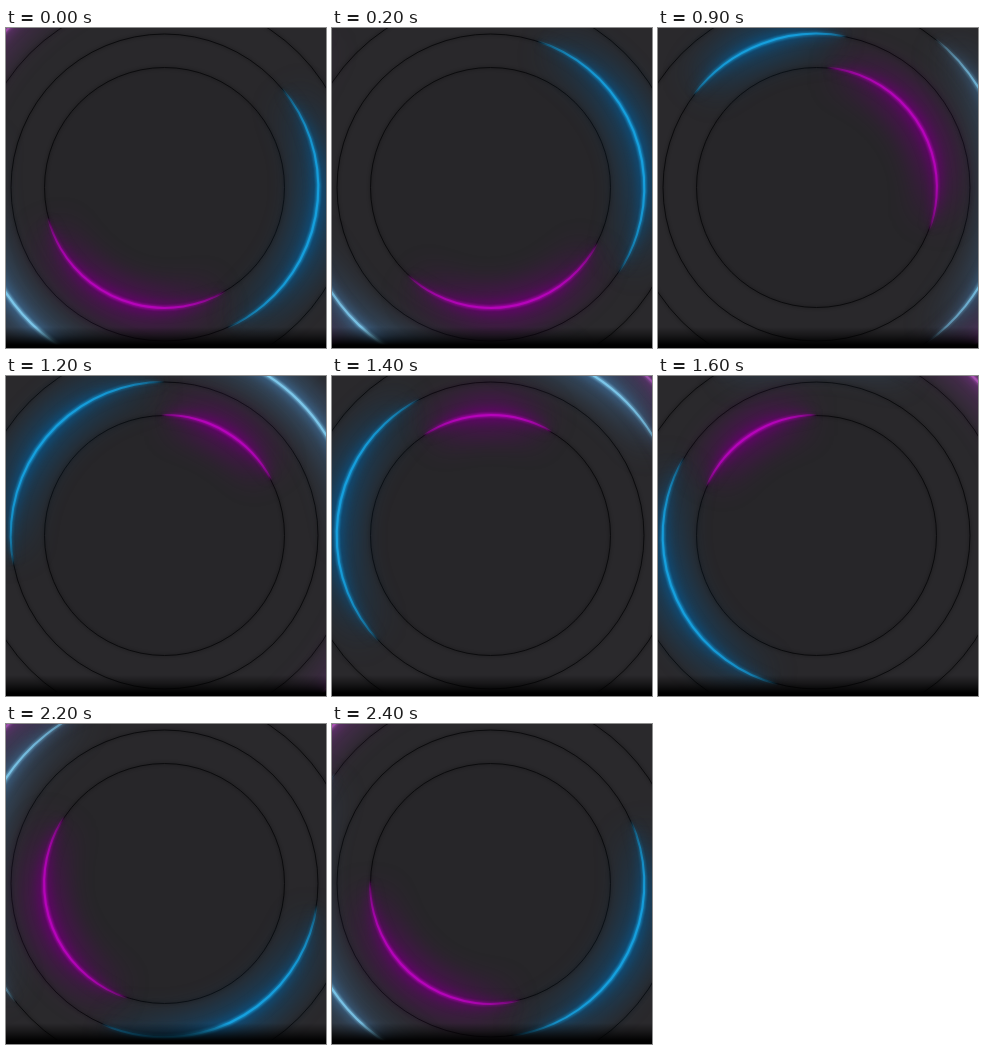
These frames come from a looping animation (320x320 px, 2.5 s). An HTML page with a canvas:

```html
<!DOCTYPE html>
<html lang="en">
<head>
<meta charset="utf-8">
<title>Neon rings</title>
<style>
  html, body { margin: 0; width: 100%; height: 100%; overflow: hidden; background: #000; }
  canvas { display: block; width: 100vw; height: 100vh; }
</style>
</head>
<body>
<canvas id="stage" width="320" height="320"></canvas>
<script>
const ctx = document.getElementById('stage').getContext('2d');
const SIZE = 320, CX = 158.5, CY = 159.5;
const STEP = 100, STEPS = 25;          // ms per step, steps per loop
const HOLD = 2.6, LAG = 6.6;           // rest at the top, delay of the tail, in steps
const SPEED = 360 / (STEPS - HOLD);    // degrees per step
const RAD = Math.PI / 180;

// top: the step at which the head of the light reaches twelve o'clock
const lights = [
  { r: 223, top: 15, core: '175,85,185', glow: '115,50,130', power: 0.8 },
  { r: 190.3, top: 11.4, core: '125,200,235', glow: '62,108,150', power: 0.95 },
  { r: 153.8, top: 3.1, core: '22,160,222', glow: '10,82,132', power: 1 },
  { r: 120.4, top: 9.3, core: '182,4,186', glow: '106,0,114', power: 1 }
];

const mod = (a, n) => ((a % n) + n) % n;
const turned = u => Math.max(0, mod(u, STEPS) - HOLD) * SPEED;

function circle(r, from = 0, to = 2 * Math.PI) {
  ctx.beginPath();
  ctx.arc(CX, CY, r, from, to);
}

function disc(r, colour) {
  ctx.fillStyle = colour;
  circle(r);
  ctx.fill();
}

function rim(r, width, colour, blur) {
  ctx.filter = blur ? `blur(${blur}px)` : 'none';
  ctx.lineWidth = width;
  ctx.strokeStyle = colour;
  circle(r);
  ctx.stroke();
  ctx.filter = 'none';
}

function drawBase() {
  ctx.fillStyle = '#2a292c';
  ctx.fillRect(0, 0, SIZE, SIZE);
  disc(153.5, '#29282b');
  disc(120, '#272629');
  for (const r of [190, 153.5, 120]) {
    rim(r, 3, 'rgba(0,0,0,0.2)', 1.5);
    rim(r, 1, '#0b0b0d', 0);
  }
}

// Strokes an arc that fades towards its ends; hidden is the part cut off at the head
function fadedArc(r, from, span, hidden, rgb, alpha, width, blur, power) {
  const g = ctx.createConicGradient(from, CX, CY);
  const full = span + hidden;
  for (let i = 0; i <= 24; i++) {
    const x = (hidden + span * i / 24) / full;
    const a = alpha * Math.pow(Math.max(0, Math.sin(Math.PI * x)), power);
    g.addColorStop(span / (2 * Math.PI) * i / 24, `rgba(${rgb},${a.toFixed(4)})`);
  }
  g.addColorStop(1, `rgba(${rgb},0)`);
  ctx.filter = blur ? `blur(${blur}px)` : 'none';
  ctx.strokeStyle = g;
  ctx.lineWidth = width;
  circle(r, from, from + span);
  ctx.stroke();
  ctx.filter = 'none';
}

function drawLight(light, step) {
  const { r, top, core, glow, power } = light;
  const head = turned(step - top);
  const tail = turned(step - top - LAG);
  const span = mod(head - tail, 360) * RAD;
  const from = mod(-90 - head, 360) * RAD;
  const rest = mod(step - top, STEPS);
  const hidden = rest < HOLD ? rest * SPEED * RAD : 0;
  const arc = (rgb, alpha, width, blur, p) =>
    fadedArc(r, from, span, hidden, rgb, alpha * power, width, blur, p);
  arc(glow, 0.55, 42, 13, 1);
  arc(glow, 0.75, 12, 4.5, 0.9);
  arc(core, 0.75, 4.4, 1.3, 0.8);
  arc(core, 1, 2, 0, 0.45);
}

function drawFloor() {
  const g = ctx.createLinearGradient(0, 299, 0, 317);
  g.addColorStop(0, 'rgba(0,0,0,0)');
  g.addColorStop(0.45, 'rgba(0,0,0,0.4)');
  g.addColorStop(1, '#000');
  ctx.fillStyle = g;
  ctx.fillRect(0, 299, SIZE, 21);
}

function draw(step) {
  drawBase();
  for (const light of lights) drawLight(light, step);
  drawFloor();
}

const start = performance.now();
let shown = -1;
function tick() {
  const step = Math.floor((performance.now() - start) / STEP) % STEPS;
  if (step !== shown) draw(shown = step);
  requestAnimationFrame(tick);
}
tick();
</script>
</body>
</html>
```
